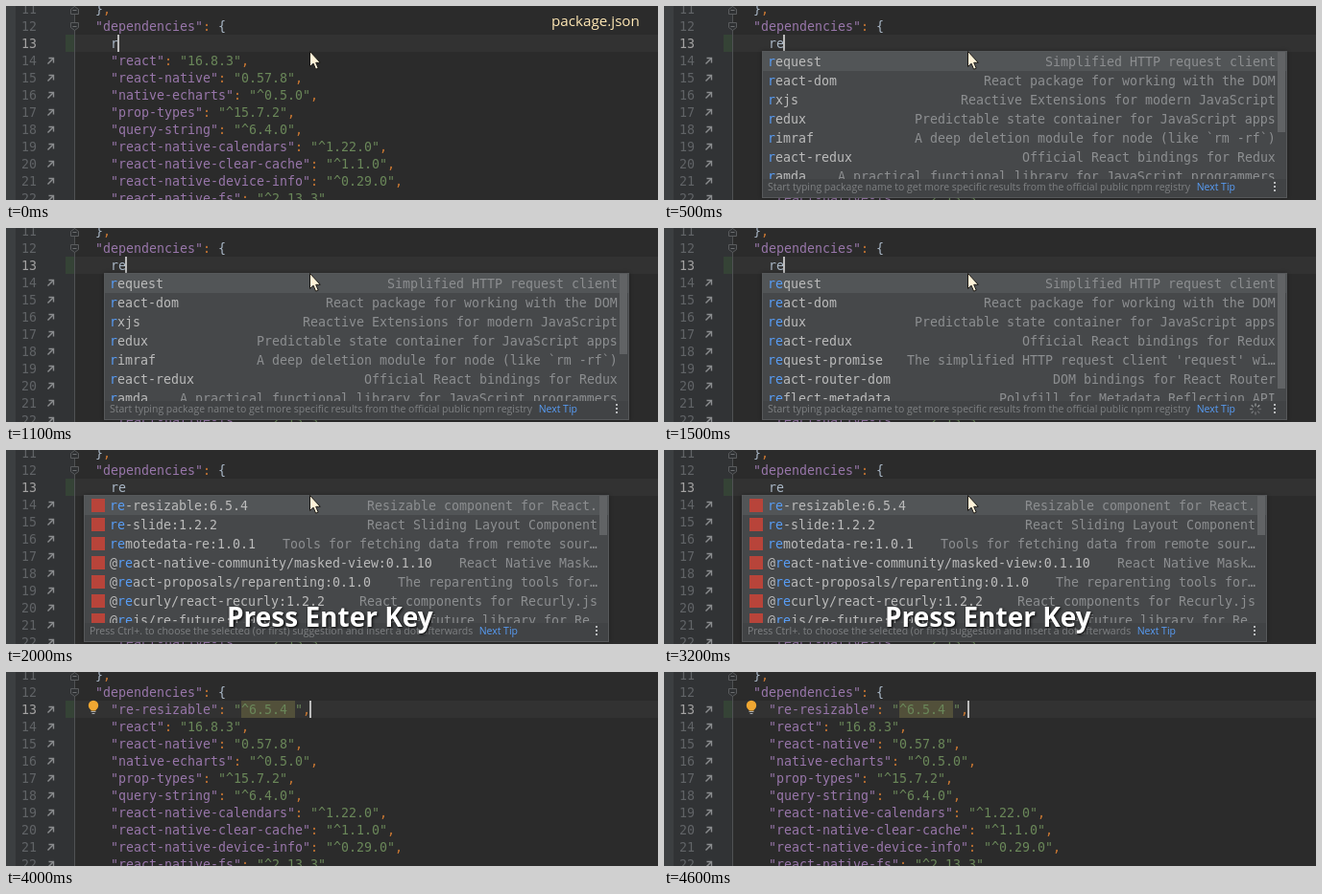
An HTML page with a canvas for the animation above (5000 ms loop, 679 px wide and 203 px high).

```html
<!DOCTYPE html>
<html lang="en">
<head>
<meta charset="utf-8">
<title>Package completion</title>
<style>
  html, body { margin: 0; width: 100%; height: 100%; overflow: hidden; background: #2b2b2b; }
  canvas { display: block; }
</style>
</head>
<body>
<canvas id="stage" width="679" height="203"></canvas>
<script>
const ctx = document.getElementById('stage').getContext('2d');
const LOOP = 5000, CELL = 8, LINE = 18, ROW = 20;
const CODE_X = 109, CARET_LINE = 13;
const MONO = '13.29px "DejaVu Sans Mono", monospace';
const SMALL = '10.47px "Open Sans", sans-serif';
const C = {
  key: '#9876aa', string: '#6a8759', mark: '#cc7832', plain: '#a9b7c6',
  link: '#589df6', item: '#bbbbbb', detail: '#8c8e90', icon: '#8b8d8f'
};

const dependencies = [
  ['react', '16.8.3'], ['react-native', '0.57.8'], ['native-echarts', '^0.5.0'],
  ['prop-types', '^15.7.2'], ['query-string', '^6.4.0'],
  ['react-native-calendars', '^1.22.0'], ['react-native-clear-cache', '^1.1.0'],
  ['react-native-device-info', '^0.29.0'], ['react-native-fs', '^2.13.3']
];

// Rows: name, description
const localPopup = {
  x: 102, right: 649, thumb: 84, match: 'r',
  tip: 'Start typing package name to get more specific results from the official public npm registry',
  rows: [
    ['request', 'Simplified HTTP request client'],
    ['react-dom', 'React package for working with the DOM'],
    ['rxjs', 'Reactive Extensions for modern JavaScript'],
    ['redux', 'Predictable state container for JavaScript apps'],
    ['rimraf', 'A deep deletion module for node (like `rm -rf`)'],
    ['react-redux', 'Official React bindings for Redux'],
    ['ramda', 'A practical functional library for JavaScript programmers']
  ]
};
const loadingPopup = {
  ...localPopup, thumb: 120, match: 're', loading: true,
  rows: [
    ['request', 'Simplified HTTP request client'],
    ['react-dom', 'React package for working with the DOM'],
    ['redux', 'Predictable state container for JavaScript apps'],
    ['react-redux', 'Official React bindings for Redux'],
    ['request-promise', "The simplified HTTP request client 'request' wi…"],
    ['react-router-dom', 'DOM bindings for React Router'],
    ['reflect-metadata', 'Polyfill for Metadata Reflection API']
  ]
};
const registryPopup = {
  x: 81, right: 628, thumb: 41, match: 're', icons: true,
  tip: 'Press Ctrl+. to choose the selected (or first) suggestion and insert a dot afterwards',
  rows: [
    ['re-resizable:6.5.4', 'Resizable component for React.'],
    ['re-slide:1.2.2', 'React Sliding Layout Component'],
    ['remotedata-re:1.0.1', 'Tools for fetching data from remote sour…'],
    ['@react-native-community/masked-view:0.1.10', 'React Native Mask…'],
    ['@react-proposals/reparenting:0.1.0', 'The reparenting tools for…'],
    ['@recurly/react-recurly:1.2.2', 'React components for Recurly.js'],
    ['@rejs/re-future:1.0.0', 'A re-future library for Re…']
  ]
};

const scenes = [
  { until: 500, typed: 'r', caret: true, title: true, pointer: true },
  { until: 1500, typed: 're', caret: true, popup: localPopup, pointer: true },
  { until: 2000, typed: 're', caret: true, popup: loadingPopup, pointer: true },
  { until: 4000, typed: 're', popup: registryPopup, pointer: true, prompt: true },
  { until: LOOP, inserted: true }
];

const lineY = n => 39 + (n - CARET_LINE) * LINE;

function rect(x, y, w, h, color) {
  ctx.fillStyle = color;
  ctx.fillRect(x, y, w, h);
}

function text(str, x, y, color, font = MONO) {
  ctx.font = font;
  ctx.fillStyle = color;
  ctx.fillText(str, x, y);
}

function stroke(points, color, width = 1) {
  ctx.strokeStyle = color;
  ctx.lineWidth = width;
  ctx.beginPath();
  points.forEach(([x, y]) => ctx.lineTo(x, y));
  ctx.stroke();
}

function circle(x, y, r, color) {
  ctx.fillStyle = color;
  ctx.beginPath();
  ctx.arc(x, y, r, 0, Math.PI * 2);
  ctx.fill();
}

// Monospaced pieces of text, each followed by its colour
function runs(x, y, ...parts) {
  for (let i = 0; i < parts.length; i += 2) {
    text(parts[i], x, y + 5, parts[i + 1]);
    x += parts[i].length * CELL;
  }
}

function dependency(name, version, y) {
  runs(CODE_X, y, `"${name}"`, C.key, ': ', C.mark, `"${version}"`, C.string, ',', C.mark);
}

function linkArrow(y) {
  stroke([[43.5, y + 3.5], [49, y - 2]], C.icon, 1.5);
  stroke([[44.5, y - 2.5], [49.5, y - 2.5], [49.5, y + 2.5]], C.icon, 1.4);
}

function foldMarker(y, flip) {
  const points = [[-4, -4], [4, -4], [4, 1], [0, 4], [-4, 1], [-4, -4]]
    .map(([dx, dy]) => [71.5 + dx, y + dy * flip]);
  ctx.fillStyle = '#2f3133';
  ctx.beginPath();
  points.forEach(([x, y]) => ctx.lineTo(x, y));
  ctx.fill();
  stroke(points, '#5a5c5e');
  stroke([[69.5, y], [73.5, y]], '#6c6e70');
}

function drawEditor(scene) {
  rect(0, 0, 679, 203, '#2b2b2b');
  rect(10, 0, 62, 203, '#313335');
  rect(0, 0, 10, 203, '#3c3f41');
  const y = lineY(CARET_LINE);
  rect(72, y - 9, 607, LINE, '#323232');
  rect(62, y - 9, 10, LINE, '#354336');
  rect(71, 0, 1, 203, '#505254');
  foldMarker(4.5, -1);
  foldMarker(21.5, 1);

  for (let n = 11; n <= 22; n++) {
    text(n, 16, lineY(n) + 5, n === CARET_LINE ? '#a4a3a3' : '#606366');
    if (n > CARET_LINE || (n === CARET_LINE && scene.inserted)) linkArrow(lineY(n));
  }
  runs(93, lineY(11), '}', C.plain, ',', C.mark);
  runs(93, lineY(12), '"dependencies"', C.key, ': ', C.mark, '{', C.plain);
  dependencies.forEach(([name, version], i) => dependency(name, version, lineY(14 + i)));

  if (scene.inserted) {
    rect(CODE_X + 17 * CELL, y - 9, 7 * CELL, LINE, '#52503a');
    dependency('re-resizable', '^6.5.4 ', y);
    rect(CODE_X + 26 * CELL - 1, y - 9, 2, LINE, '#bbbbbb');
    drawBulb();
  } else {
    runs(CODE_X, y, scene.typed, C.plain);
    if (scene.caret) rect(CODE_X + scene.typed.length * CELL - 1, y - 9, 2, LINE, '#bbbbbb');
  }
}

function drawBulb() {
  circle(91, 35, 5.2, '#f0a732');
  rect(88.5, 38, 5, 2.5, '#f0a732');
  rect(88.5, 41, 5, 1, '#a9abad');
  rect(89.5, 43, 3, 1, '#a9abad');
}

function drawPopup({ x, right, thumb, match, rows, tip, icons, loading }) {
  const top = 47, footer = 181, bottom = 201;
  ctx.save();
  ctx.shadowColor = 'rgba(0,0,0,.3)';
  ctx.shadowBlur = 4;
  rect(x, top, right - x, bottom - top, '#56585a');
  ctx.restore();
  rect(x + 1, top + 1, right - x - 2, bottom - top - 2, '#46484a');
  rect(x + 1, top + 1, right - x - 2, ROW, '#525557');

  rows.forEach(([name, detail], i) => {
    const y = 58 + i * ROW;
    const start = name.indexOf(match), end = start + match.length;
    if (icons) rect(89, y - 7, 14, 14, '#b8443a');
    runs(108, y, name.slice(0, start), C.item, match, C.link, name.slice(end), C.item);
    runs(right - 12 - detail.length * CELL, y, detail, C.detail);
  });
  rect(right - 10, top + 1, 8, thumb, '#616365');

  rect(x + 1, footer, right - x - 2, bottom - footer - 1, '#414345');
  text(tip, x + 6, 193, '#7f8183', SMALL);
  const tipEnd = x + 6 + ctx.measureText(tip).width;
  text('Next Tip', tipEnd + 6.5, 193, C.link, SMALL);
  for (const dy of [-4, 0, 4]) rect(right - 14, 188 + dy, 2, 2, '#b9bbbd');
  if (loading) drawSpinner(616, 189.5);
}

function drawSpinner(x, y) {
  for (let i = 0; i < 8; i++) {
    const dx = Math.cos(i * Math.PI / 4), dy = Math.sin(i * Math.PI / 4);
    stroke([[x + dx * 3, y + dy * 3], [x + dx * 6, y + dy * 6]], `rgba(175,177,179,${0.3 + i * 0.07})`, 1.4);
  }
}

function drawPointer() {
  const path = new Path2D('M316.5 47.5v16l3.6-3.3 2.5 6 2.6-1.1-2.5-5.8h4.6z');
  ctx.fillStyle = '#fff2d8';
  ctx.fill(path);
  ctx.strokeStyle = '#1c1a17';
  ctx.lineWidth = 1;
  ctx.stroke(path);
}

function drawPrompt() {
  ctx.save();
  ctx.shadowColor = '#000';
  ctx.shadowBlur = 3;
  ctx.shadowOffsetX = ctx.shadowOffsetY = 1;
  text('Press Enter Key', 230, 185, '#fff', 'bold 28px "Open Sans", sans-serif');
  ctx.restore();
}

function render() {
  const time = performance.now() % LOOP;
  const scene = scenes.find(s => time < s.until);
  drawEditor(scene);
  if (scene.title) text('package.json', 568, 21, '#ffe8b5', '15.2px "Open Sans", sans-serif');
  if (scene.popup) drawPopup(scene.popup);
  if (scene.prompt) drawPrompt();
  if (scene.pointer) drawPointer();
  requestAnimationFrame(render);
}
render();
</script>
</body>
</html>
```
